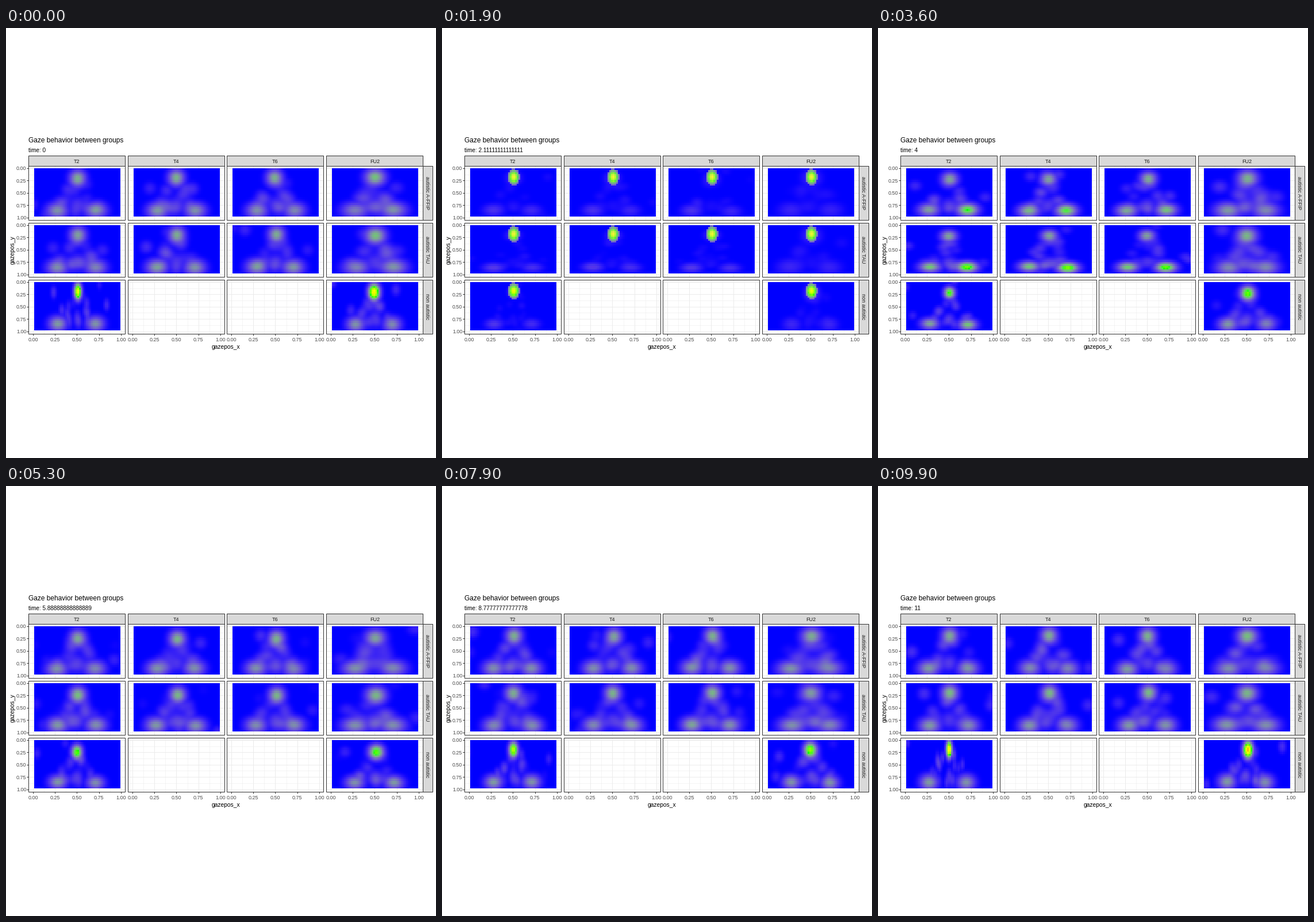
Animation of 748x748 px, one loop 10000 ms. Source, as a matplotlib script:

```python
import numpy as np
import matplotlib.pyplot as plt
from matplotlib.animation import FuncAnimation
from matplotlib.patches import Rectangle

SIZE, DPI, FRAMES = 748, 100, 100
PX = 72 / DPI
plt.rcParams["font.family"] = "Liberation Sans"

COLS = ["T2", "T4", "T6", "FU2"]
ROWS = ["autistic A-FFIP", "autistic TAU", "non autistic"]
LEFT = [39.5 + round(172.7 * c) for c in range(4)]
TOP = [239.5 + 99 * r for r in range(3)]
PW, PH = 168, 94.5
PANELS = [(r, c) for r in range(3) for c in range(4) if r < 2 or c in (0, 3)]
NX, NY = 50, 25

gx, gy = np.meshgrid((np.arange(NX) + .5) / NX * .98 + .01,
                     (np.arange(NY) + .5) / NY * .97 + .015)

M = np.array([[.4124564, .3575761, .1804375],
              [.2126729, .7151522, .0721750],
              [.0193339, .1191920, .9503041]])
WHITE = M.sum(1)


def rgb_to_lab(rgb):
    lin = np.where(rgb > .04045, ((rgb + .055) / 1.055) ** 2.4, rgb / 12.92)
    f = lin @ M.T / WHITE
    f = np.where(f > .008856, np.cbrt(f), 7.787 * f + 16 / 116)
    return np.stack([116 * f[..., 1] - 16, 500 * (f[..., 0] - f[..., 1]),
                     200 * (f[..., 1] - f[..., 2])], -1)


def lab_to_rgb(lab):
    y = (lab[..., 0] + 16) / 116
    f = np.stack([y + lab[..., 1] / 500, y, y - lab[..., 2] / 200], -1)
    xyz = np.where(f > .20689, f ** 3, (f - 16 / 116) / 7.787) * WHITE
    lin = np.clip(xyz @ np.linalg.inv(M).T, 0, 1)
    return np.where(lin > .0031308, 1.055 * lin ** (1 / 2.4) - .055, 12.92 * lin)


# Levels 0 to 5: blue, green, yellow, red, white, black
STOPS = rgb_to_lab(np.array([[0, 0, 1], [0, 1, 0], [1, 1, 0],
                             [1, 0, 0], [1, 1, 1], [0, 0, 0]], float))


def level_to_lab(v):
    return np.stack([np.interp(v, range(len(STOPS)), STOPS[:, i]) for i in range(3)], -1)


def blob(x, y, sx, sy):
    return np.exp(-((gx - x) / sx) ** 2 / 2 - ((gy - y) / sy) ** 2 / 2)


def bump(k, mid, width):
    return np.exp(-((k - mid) / width) ** 2)


def smooth_state(k, r, c):
    """Gaze on the head and both hands, with faint traces in between."""
    rng = np.random.default_rng(100 * k + 10 * r + c)
    control, late = r == 2, c == 3
    ends = ((k - 5) / 6) ** 2
    calm = 0 if late else bump(k, 3.4, .9)

    bx = .05 + .012 * late - .016 * control * (1 + ends)
    by = .092 - (.025 + .02 * (r == 1)) * calm - .012 * control * (1 - ends)
    hx, hy = 1.3 * max(bx, .042), .9 * by
    head = 1.1 + 1.3 * ends if control else .62
    gain = .45 + .3 * (r == 1)
    left = .5 + gain * (0 if late else bump(k, 3, 1))
    right = .46 + gain * (0 if late else bump(k, 3.8, .8))

    level = rng.normal(1, .08, 3)
    x = np.array([.505, .275, .71]) + rng.normal(0, .007, 3)
    y = np.array([.21 + .05 * bump(k, 6, 2), .86, .86]) + rng.normal(0, .007, 3)
    main = (head * level[0] * blob(x[0], y[0], bx, by)
            + left * level[1] * blob(x[1], y[1], hx, hy)
            + right * level[2] * blob(x[2], y[2], hx, hy))

    faint = .1 * blob(.5, .76, bx, by)
    for n in range(24):
        u, hand = rng.random(), 1 + n % 2
        if n < 14:
            px, py = x[0] + (x[hand] - x[0]) * u, y[0] + (y[hand] - y[0]) * u
        elif n < 21:
            px, py = x[1] + (x[2] - x[1]) * u, .82
        else:
            px, py = rng.random(2)
        px, py = rng.normal((px, py), .03)
        faint += rng.uniform(.02, .09) * blob(px, py, bx * .8, by * .75)
    return np.hypot(main, faint)


def sharp_state(k, r, c):
    """Everyone looks at the head: raw cells first, then a plain core."""
    core = blob(.505, .19, .036, .085)
    if k == 2:
        return 2 * core * (core > .15)
    rng = np.random.default_rng(500 + 10 * r + c)
    v = 5.4 * core * rng.uniform(.3, 1.3, core.shape)
    v[core < .1] = 0
    halo = rng.random(core.shape) < .4 * blob(.48, .18, rng.uniform(.06, .11), .085)
    v = np.maximum(v, halo * rng.uniform(.05, 1, core.shape) ** 1.5)

    def put(x, y, level):
        col, row = int(x * NX), int(y * NY)
        if 0 <= col < NX and 0 <= row < NY:
            v[row, col] = max(v[row, col], level)

    foot = rng.uniform(.25, .65)
    for u in rng.uniform(.2, 1, 8):
        put(.5 + (foot - .5) * u, .2 + .72 * u, rng.uniform(.08, .25))
    for _ in range(2):
        put(*rng.random(2), rng.uniform(.1, .9))
    return np.minimum(v, 4.9)


def state(k):
    make = sharp_state if k in (1, 2) else smooth_state
    return np.array([level_to_lab(make(k, r, c)) for r, c in PANELS])


STATES = [state(k) for k in range(12)]

fig = plt.figure(figsize=(SIZE / DPI, SIZE / DPI), dpi=DPI, facecolor="white")
ax = fig.add_axes([0, 0, 1, 1])


def line(xs, ys, color="#333333", w=1.0, z=1):
    ax.plot(xs, ys, color=color, lw=w * PX, zorder=z, solid_capstyle="butt")


def box(x, y, w, h, fill, z):
    ax.add_patch(Rectangle((x, y), w, h, fc=fill, ec="#333333", lw=PX, zorder=z))


def label(x, y, s, px, color="black", ha="center", va="baseline", rot=0):
    return ax.text(x, y, s, fontsize=px * PX, color=color, ha=ha, va=va,
                   rotation=rot, zorder=6)


def x_at(c, v):
    return LEFT[c] + PW * (.05 + v) / 1.1


def y_at(r, v):
    return TOP[r] + PH * (.05 + v) / 1.1


TICKS = np.arange(5) / 4
for r, top in enumerate(TOP):
    for c, left in enumerate(LEFT):
        for v in np.arange(9) / 8:
            w = 1 if v in TICKS else .5
            line([x_at(c, v)] * 2, [top, top + PH], "#ebebeb", w)
            line([left, left + PW], [y_at(r, v)] * 2, "#ebebeb", w)
        box(left, top, PW, PH, "none", 4)
    box(LEFT[3] + PW, top, 17, PH, "#d9d9d9", 3)
    label(732.5, top + PH / 2, ROWS[r], 8.9, "#1a1a1a", va="center", rot=270)
    for v in TICKS:
        y = y_at(r, v)
        line([36.5, 39.5], [y, y])
        label(35.5, y + 3.3, f"{v:.2f}", 9, "#4d4d4d", ha="right")

for c, left in enumerate(LEFT):
    box(left, 222, PW, 17.5, "#d9d9d9", 3)
    label(left + PW / 2, 234.5, COLS[c], 9, "#1a1a1a")
    for v in TICKS:
        x = x_at(c, v)
        line([x, x], [532, 535])
        label(x, 545, f"{v:.2f}", 9, "#4d4d4d")

label(39, 199, "Gaze behavior between groups", 11.9, ha="left")
clock = label(39, 216, "", 10, ha="left")
label(382, 558, "gazepos_x", 10.3)
label(11.5, 386, "gazepos_y", 10.3, va="center", rot=90)

maps = []
for r, c in PANELS:
    area = x_at(c, .01), x_at(c, .99), y_at(r, .985), y_at(r, .015)
    maps.append(ax.imshow(np.zeros((NY, NX, 3)), extent=area,
                          interpolation="nearest", aspect="auto", zorder=2))
ax.set_xlim(0, SIZE)
ax.set_ylim(SIZE, 0)
ax.axis("off")


def draw(n):
    t = n / 9
    k = min(n // 9, 10)
    rgb = lab_to_rgb(STATES[k] + (STATES[k + 1] - STATES[k]) * (t - k))
    for im, pixels in zip(maps, rgb):
        im.set_data(pixels)
    clock.set_text(f"time: {t:.15g}")
    return [*maps, clock]


anim = FuncAnimation(fig, draw, frames=FRAMES, interval=100, repeat=True, repeat_delay=0)
plt.show()
```
